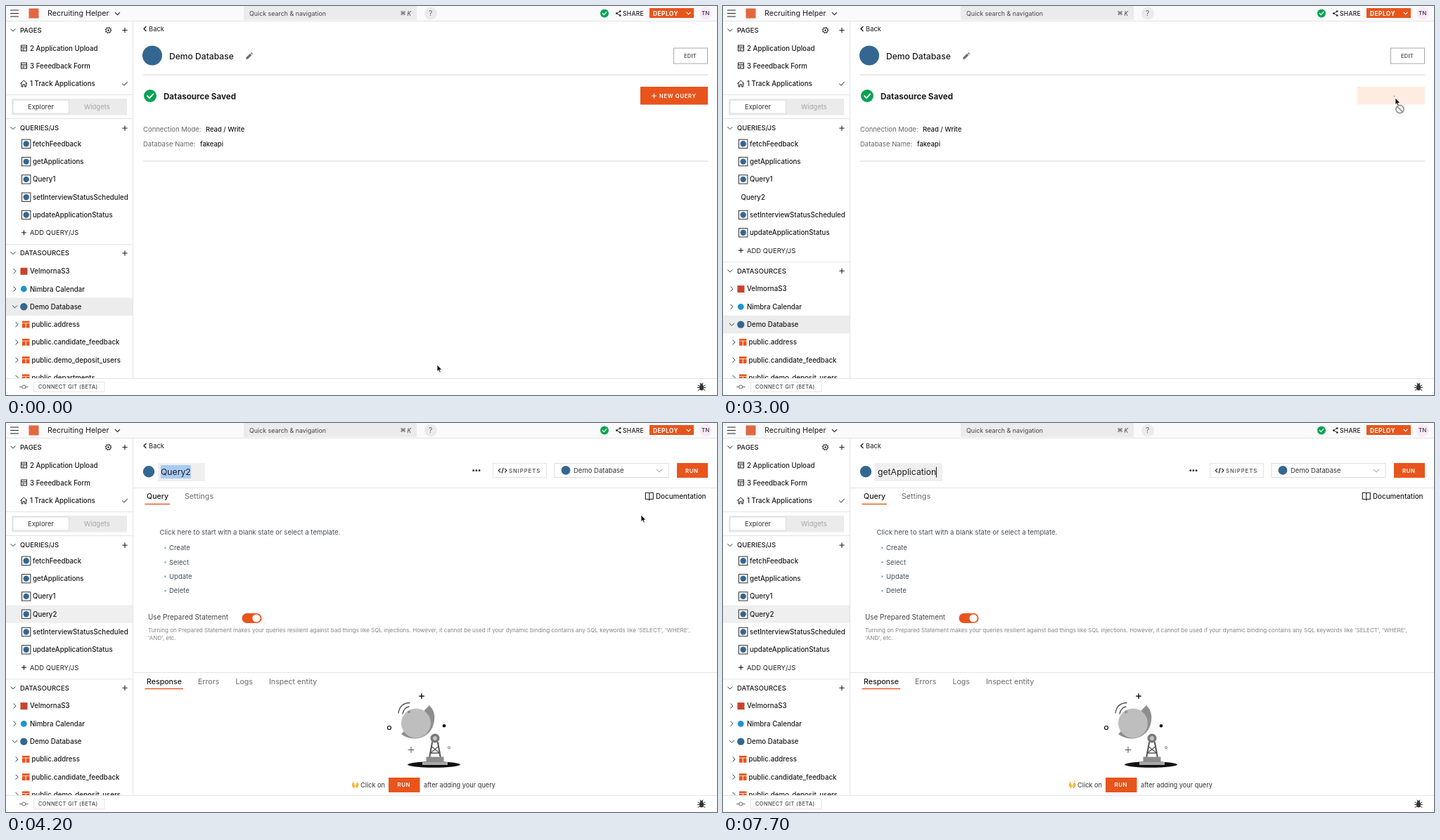
Write an HTML page that moves like this. It is 1011 by 554 pixels and loops after 8000 ms.

```html
<!DOCTYPE html>
<html lang="en">
<head>
<meta charset="utf-8">
<title>Query editor</title>
<style>
html, body { margin: 0; width: 100%; height: 100%; overflow: hidden; background: #fff; }
svg { display: block; width: 1011px; height: 554px; }
text { font-family: Inter, "Open Sans", "DejaVu Sans", sans-serif; white-space: pre; }
</style>
</head>
<body>
<svg id="stage" viewBox="0 0 1011 554"></svg>
<script>
const ORANGE = '#e8551c', GREEN = '#08a354', BLUE = '#336791', INK = '#1c1c1c', GREY = '#6a6a6a', RULE = '#e4e4e4';
const stage = document.getElementById('stage');
let layer = stage;

function el(tag, attrs, parent = layer) {
  const node = document.createElementNS('http://www.w3.org/2000/svg', tag);
  for (const k in attrs) node.setAttribute(k, attrs[k]);
  return parent.appendChild(node);
}
function group(draw, attrs = {}) {
  const outer = layer, g = el('g', attrs);
  layer = g;
  draw();
  layer = outer;
  return g;
}
const box = (x, y, width, height, fill, more) => el('rect', { x, y, width, height, fill, ...more });
const dot = (cx, cy, r, fill, more) => el('circle', { cx, cy, r, fill, ...more });
const line = (d, stroke = INK, w = 1, more) =>
  el('path', { d, fill: 'none', stroke, 'stroke-width': w, 'stroke-linecap': 'round', 'stroke-linejoin': 'round', ...more });
const shape = (d, fill, more) => el('path', { d, fill, ...more });
const frame = (x, y, w, h, stroke) => box(x, y, w, h, '#fff', { stroke });

// cy is the middle of the capitals
function text(x, cy, str, size = 9.7, fill = INK, weight = 400, spacing = 0) {
  const t = el('text', { x, y: cy + size * 0.364, 'font-size': size, fill, 'font-weight': weight });
  if (spacing) t.style.letterSpacing = spacing + 'px';
  t.textContent = str;
  return t;
}
const item = (x, cy, str) => text(x, cy, str, 9.7, INK, 500);
const rule = (x1, x2, y, c = RULE) => line(`M${x1} ${y}H${x2}`, c, 1, { 'stroke-linecap': 'butt' });
const plus = (x, y, r = 3.2, c = INK, w = 1.1) => line(`M${x - r} ${y}h${2 * r}M${x} ${y - r}v${2 * r}`, c, w);
const down = (x, y, r = 3.2, c = '#333', w = 1) => line(`M${x - r} ${y - r / 2}l${r} ${r} ${r} ${-r}`, c, w);
const right = (x, y, r = 3.2, c = '#333') => line(`M${x - r / 2} ${y - r}l${r} ${r} ${-r} ${r}`, c, 1);
function tick(x, y, r) {
  dot(x, y, r, GREEN);
  line(`M${x - r * .45} ${y}l${r * .33} ${r * .35} ${r * .6} ${-r * .65}`, '#fff', r * .2);
}

/* ---------- top bar ---------- */
function topBar() {
  box(0, 0, 1011, 21, '#fafafa');
  rule(0, 1011, 21.5);
  line('M6.5 6h11M6.5 10.5h11M6.5 15h11', '#222', 1.2);
  box(32.5, 3.5, 14, 14, '#e2673f');
  text(59, 10.5, 'Recruiting Helper', 10.7, INK);
  down(158.5, 11, 3.2, '#222', 1.2);
  box(338, 0, 246, 20, '#ebebeb');
  text(346, 10.5, 'Quick search & navigation', 8.9, '#444');
  text(560.5, 10.5, '⌘', 8.2, '#444');
  text(570.5, 10.5, 'K', 8.4, '#444').setAttribute('font-style', 'italic');
  dot(604, 10.5, 9, '#ebebeb');
  text(601, 10.5, '?', 10.5, GREY);
  tick(851, 10.5, 6);
  line('M873.3 7.5L868.3 10.5L873.3 13.5', INK, .9);
  [[873.3, 7.5], [868.3, 10.5], [873.3, 13.5]].forEach(p => dot(...p, 1.3, INK));
  text(877, 10.5, 'SHARE', 8.5, INK, 500, .3);
  box(915, 3, 63, 14, ORANGE);
  text(920, 10.5, 'DEPLOY', 8.4, '#fff', 700, .45);
  down(970.5, 10.5, 2.6, '#fff', 1.2);
  dot(995, 10.5, 9, '#f8ebf6');
  text(989, 10.5, 'TN', 8, '#4b2a5c', 500);
}

/* ---------- sidebar ---------- */
function section(y, label) {
  down(10, y);
  text(20, y, label, 9.5, INK, 500);
  plus(169, y);
}
function queryIcon(y) {
  box(22.5, y - 6.2, 12.4, 12.4, '#fff', { stroke: '#333' });
  dot(28.7, y, 4.2, BLUE);
}
function queryRow(y, name) {
  queryIcon(y);
  item(38, y, name);
}
function pageIcon(y) {
  box(21.5, y - 4, 8, 8, 'none', { stroke: INK });
  line(`M21.5 ${y - 1.5}h8M23.5 ${y + .5}h2M23.5 ${y + 2.3}h2M27 ${y + .5}h1`, INK, .9);
}
function tableRow(y, name) {
  right(15.5, y);
  box(23, y - 5, 10.5, 2.8, ORANGE);
  box(23, y - 1.5, 4.7, 6.3, ORANGE);
  box(28.7, y - 1.5, 4.8, 6.3, ORANGE);
  item(36.5, y, name);
}
let newRow, newRowIcon, newRowLabel, newRowBack, lower, sourceBack;
function sidebar() {
  section(34.5, 'PAGES');
  dot(145.5, 34.5, 3.4, 'none', { stroke: INK });
  dot(145.5, 34.5, 4.4, 'none', { stroke: INK, 'stroke-dasharray': '1.5 1.96' });
  dot(145.5, 34.5, 1.2, INK);
  pageIcon(60);
  item(34, 60, '2 Application Upload');
  pageIcon(85);
  item(34, 85, '3 Feeedback Form');
  line('M20.5 110.5L25.3 106L30 110.5M22 109.5V115H24V111.8H26.6V115H28.6V109.5', INK, 1);
  item(34, 110.5, '1 Track Applications');
  line('M165.5 110.8l2.4 2.3 4.6-5', INK, 1);
  rule(0, 180, 126.5);
  box(8, 132, 164, 23.5, '#ebebeb');
  box(10, 134, 79.5, 19, '#fff', { stroke: '#dadada' });
  text(31, 143.5, 'Explorer', 9.45, '#333');
  text(111, 143.5, 'Widgets', 9.45, '#a5a5a5');
  rule(0, 180, 160.5);
  section(174, 'QUERIES/JS');
  queryRow(196.3, 'fetchFeedback');
  queryRow(221.6, 'getApplications');
  queryRow(246.9, 'Query1');
  newRow = group(() => {
    newRowBack = box(0, 259.5, 180, 25.3, '#efefef');
    newRowIcon = group(() => queryIcon(272.2));
    newRowLabel = item(38, 272.2, 'Query2');
  });
  lower = group(() => {
    queryRow(272.2, 'setInterviewStatusScheduled');
    queryRow(297.5, 'updateApplicationStatus');
    plus(25.5, 322.8, 3);
    text(34, 322.8, 'ADD QUERY/JS', 9.45, '#222');
    rule(0, 180, 339.5);
    section(352, 'DATASOURCES');
    right(12.5, 377.6);
    box(20.5, 372.8, 10, 10, '#c8432c');
    item(34, 377.6, 'VelmornaS3');
    right(12.5, 403);
    dot(25.3, 403, 4.4, '#1f93cf');
    item(34, 403, 'Nimbra Calendar');
    sourceBack = box(0, 415.5, 180, 25.5, '#ececec');
    down(12.5, 428.3);
    dot(25.3, 428.3, 5.2, BLUE);
    item(34, 428.3, 'Demo Database');
    ['address', 'candidate_feedback', 'demo_deposit_users', 'departments']
      .forEach((n, i) => tableRow(453.6 + i * 25.3, 'public.' + n));
  });
}

/* ---------- datasource page ---------- */
let newQuery, hoverEdge, loading;
function sourcePage() {
  dot(208, 70.5, 14, BLUE);
  text(232, 71.5, 'Demo Database', 12.1, INK, 500);
  shape('M341.3 75.8V73.4L347 67.7L349.4 70.1L343.7 75.8ZM347.8 66.9L348.9 65.9L351.2 68.2L350.2 69.3Z', '#6f6f6f');
  frame(949.5, 60, 48, 22, '#a9a9a9');
  text(964, 71, 'EDIT', 7.4, '#555', 600, .3);
  rule(195, 998, 98, '#d5d5d5');
  tick(205, 128, 9);
  text(224, 128.5, 'Datasource Saved', 11.6, INK, 700);
  newQuery = group(() => {
    box(902, 115, 96, 25.5, ORANGE);
    plus(921.5, 128, 3, '#fff', 1.1);
    text(929, 128, 'NEW QUERY', 7.6, '#fff', 600, .7);
    hoverEdge = line('M902.5 115V140.5M997.5 115V140.5', '#5a3426', 1);
  });
  loading = group(() => {
    box(902, 115, 96, 25.5, '#ffece1');
    dot(954.5, 128.5, .8, ORANGE);
  });
  text(195, 175.5, 'Connection Mode:', 9.5, '#666');
  text(284, 175.5, 'Read / Write', 9.45, INK, 500);
  text(195, 196.7, 'Database Name:', 9.5, '#666');
  text(276, 196.7, 'fakeapi', 9.45, INK, 500);
  rule(195, 998, 221, '#d5d5d5');
}

/* ---------- query page ---------- */
function dish() {
  plus(591, 389, 3.2, '#111', 1.4);
  plus(576, 465.5, 4, '#555', 1);
  dot(545, 434, 2.5, 'none', { stroke: '#111', 'stroke-width': 1.2 });
  dot(623, 431.2, 2.3, '#111');
  dot(630, 462.4, 1.6, 'none', { stroke: '#555', 'stroke-width': .8 });
  line('M558 413Q560 399 574 398.5M564 414Q566 405 573 404', '#555', 1.3);
  el('ellipse', { cx: 608.5, cy: 486.5, rx: 37.5, ry: 4.2, fill: '#111' });
  line('M606 455L602 477M614 455L618 477', '#555', 2);
  line('M605.5 461L616.5 470M614.5 461L603.5 470M604 470H616', '#555', 1.3);
  shape('M597.5 475.5H622.5V483H597.5Z', '#8c8c8c');
  shape('M592 483H628V487H592Z', '#a8a8a8');
  shape('M602 402Q611 411 609 424Q606 444 587 449Q572 451 562 443Z', '#8e8e8e');
  dot(583, 427.5, 21, '#bebebe');
  dot(573, 411.5, 2, '#8e8e8e');
  dot(610, 449, 6.5, '#777');
  dot(610, 449, 3, '#c4c4c4');
}
let titleBack, selection, title, caret;
function queryPage() {
  dot(203, 69.3, 8.2, BLUE);
  titleBack = box(216, 57, 67, 26, '#efefef');
  selection = box(220, 60, 43, 19, '#a9cbf3');
  title = text(220, 70, '', 12.2, '#222');
  caret = box(227, 62.5, 1, 15, '#111');
  [664.7, 668.9, 673.1].forEach(x => dot(x, 67.7, 1.4, INK));
  frame(692.5, 57.5, 76, 20, RULE);
  line('M702.6 65.3l-2.3 2.4 2.3 2.4M709.6 65.3l2.3 2.4-2.3 2.4M707.1 64.3l-2 6.8', INK, 1.2);
  text(715, 67.7, 'SNIPPETS', 7.8, '#444', 500, .9);
  frame(780, 57.5, 162, 20, '#dcdcdc');
  dot(796, 67.3, 6.4, BLUE);
  text(807, 67.7, 'Demo Database', 9.5, '#333');
  down(929, 68, 4, '#999');
  box(954, 57, 44, 21, ORANGE);
  text(966, 67.7, 'RUN', 7.8, '#fff', 600, .65);
  rule(181, 1011, 92.5);
  text(200, 104.5, 'Query', 10.6, INK, 500);
  text(254, 104.5, 'Settings', 10.65, GREY);
  box(197.5, 114.8, 35.5, 1.4, ORANGE);
  line('M914.8 100.3V109.7M909.3 99.3H913Q914.8 99.3 914.8 101Q914.8 99.3 916.6 99.3H920.3V108.5H916.5Q914.8 108.5 914.8 110Q914.8 108.5 913 108.5H909.3Z', INK, 1.1);
  text(924, 104.3, 'Documentation', 9.8, INK, 500);
  text(218.5, 156, 'Click here to start with a blank state or select a template.', 9.6, '#454d5c');
  ['Create', 'Select', 'Update', 'Delete'].forEach((s, i) => {
    const y = 177.8 + i * 20.4;
    dot(226.5, y, 1.3, '#9aa2ae');
    text(232, y, s, 9.5, '#454d5c');
  });
  text(202, 276.7, 'Use Prepared Statement', 9.9, '#444');
  box(335.5, 271, 28, 14, ORANGE, { rx: 7 });
  dot(356, 278, 5.6, '#fff');
  text(202, 295.2, "Turning on Prepared Statement makes your queries resilient against bad things like SQL injections. However, it cannot be used if your dynamic binding contains any SQL keywords like 'SELECT', 'WHERE',", 8.06, '#858585');
  text(202, 306.3, "'AND', etc.", 8.06, '#858585');
  rule(181, 1011, 355.5);
  text(200, 367.7, 'Response', 10.6, INK, 500);
  text(273, 367.7, 'Errors', 10.6, GREY);
  text(326.5, 367.7, 'Logs', 10.6, GREY);
  text(374, 367.7, 'Inspect entity', 10.65, GREY);
  box(197.5, 377.8, 54.5, 1.4, ORANGE);
  dish();
  shape('M492 513Q491 518 495 520.5L496.5 517L494.5 512ZM501.3 513Q502.3 518 498.3 520.5L496.8 517L498.8 512Z', '#f5b83d');
  line('M493 510.5l.6 1M500.3 510.5l-.6 1', '#f5b83d', 1);
  text(504, 515.5, 'Click on', 9.2, '#333');
  box(544, 505, 44.5, 21, ORANGE);
  text(556.5, 515.5, 'RUN', 7.8, '#fff', 600, .65);
  text(594, 515.5, 'after adding your query', 9.2, '#333');
}

/* ---------- bottom bar ---------- */
let status;
function bottomBar() {
  box(0, 530, 1011, 24, '#fff');
  rule(0, 1011, 530.5);
  dot(25.3, 542.5, 2.5, 'none', { stroke: '#666' });
  line('M19.5 542.5h3M28.2 542.5h3', '#666', 1);
  frame(39.5, 535.5, 100.5, 14, RULE);
  text(46, 542.5, 'CONNECT GIT (BETA)', 7.4, '#444', 500, .4);
  el('ellipse', { cx: 989, cy: 543.5, rx: 3, ry: 4, fill: '#333' });
  dot(989, 539.5, 2, '#333');
  line('M984 540l2.5 1.5M994 540l-2.5 1.5M983.5 543.5h11M984 547.5l2.5-1.7M994 547.5l-2.5-1.7M987 537l.8 1.2M991 537l-.8 1.2', '#333', 1);
  status = group(() => {
    shape('M0 540H334Q336 540 336 542V554H0Z', '#1d1d1d');
    text(3, 547.3, 'Waiting for app.velmorna.com...', 8.1, '#f2f2f2', 600);
  });
}

/* ---------- pointer ---------- */
let pointer, arrow, hand, denied;
function pointers() {
  pointer = group(() => {
    arrow = shape('M0 0V9.6L2.2 7.6L3.7 11.1L5.3 10.4L3.8 7H6.8Z', '#000', { stroke: '#fff', 'stroke-width': .8 });
    hand = shape('M-.9 1.2Q-.9 0 .1 0Q1.1 0 1.1 1.2V4.6Q2.4 4 2.8 5Q4.2 4.5 4.5 5.5Q6 5.3 6 6.8V9Q5.6 10.5 5 12H-.6Q-1.5 10-3.4 8Q-4 6.9-3 6.6Q-1.8 6.6-.9 7.8Z', '#fff', { stroke: '#111', 'stroke-width': .9 });
    denied = group(() => {
      dot(6.5, 16, 5.6, '#f4f4f4', { stroke: '#959595', 'stroke-width': 1.7 });
      line('M2.7 12.2L10.3 19.8', '#959595', 1.7);
    });
  });
}

box(0, 0, 1011, 554, '#fff');
el('rect', { x: 0, y: 22, width: 180, height: 508 }, el('clipPath', { id: 'side' }));
group(sidebar, { 'clip-path': 'url(#side)' });
line('M180.5 22V530', RULE);
line('M199 29.5l-3 3 3 3', INK, 1.4);
text(203, 32.7, 'Back', 9.4, INK);
const sourceView = group(sourcePage);
const queryView = group(queryPage);
bottomBar();
topBar();
pointers();

/* ---------- timing ---------- */
const LOOP = 8000, STEP = 100;
const CLICK = 2800, ROW = 2900, OPEN = 3200, STATUS_END = 3900;
const WORD = 'getApplication';
const keyTimes = [5400, 5500, 5600, 5900, 6100, 6300, 6800, 7000, 7100, 7200, 7400, 7500, 7600, 7700];
const path = [[0, 613, 511], [200, 613, 511], [1700, 956, 131], [3600, 956, 131], [4200, 903, 131], [LOOP, 903, 131]];

function place(t) {
  const i = path.findIndex(p => p[0] > t);
  const [t0, x0, y0] = path[i - 1], [t1, x1, y1] = path[i];
  const u = (t - t0) / (t1 - t0), e = u * u * (3 - 2 * u);
  return [x0 + (x1 - x0) * e, y0 + (y1 - y0) * e];
}
const show = (node, on) => node.setAttribute('display', on ? 'inline' : 'none');

function render(t) {
  const [x, y] = place(t);
  const typed = keyTimes.filter(k => k <= t).length;
  const open = t >= OPEN, busy = t >= CLICK && !open;
  const hover = t < CLICK && x > 902 && y > 115 && y < 140.5;

  show(sourceView, !open);
  show(queryView, open);
  show(newQuery, !busy);
  show(hoverEdge, hover);
  show(loading, busy);

  show(newRow, t >= ROW);
  show(newRowBack, open);
  show(newRowIcon, open);
  newRowLabel.setAttribute('x', open ? 38 : 25.5);
  lower.setAttribute('transform', `translate(0 ${t >= ROW ? 25.3 : 0})`);
  show(sourceBack, !open);
  show(status, open && t < STATUS_END);

  if (open) {
    title.textContent = typed ? WORD.slice(0, typed) : 'Query2';
    const w = title.getComputedTextLength();
    titleBack.setAttribute('width', Math.max(67, w + 12.5));
    selection.setAttribute('width', w);
    show(selection, !typed);
    caret.setAttribute('x', 220 + w - .3);
    show(caret, typed > 0);
  }

  show(pointer, !typed);
  show(arrow, !hover);
  show(hand, hover);
  show(denied, busy);
  pointer.setAttribute('transform', `translate(${x} ${y})`);
}

const start = performance.now();
function tickFrame() {
  const t = (performance.now() - start) % LOOP;
  render(Math.floor(t / STEP) * STEP);
  requestAnimationFrame(tickFrame);
}
tickFrame();
</script>
</body>
</html>
```
